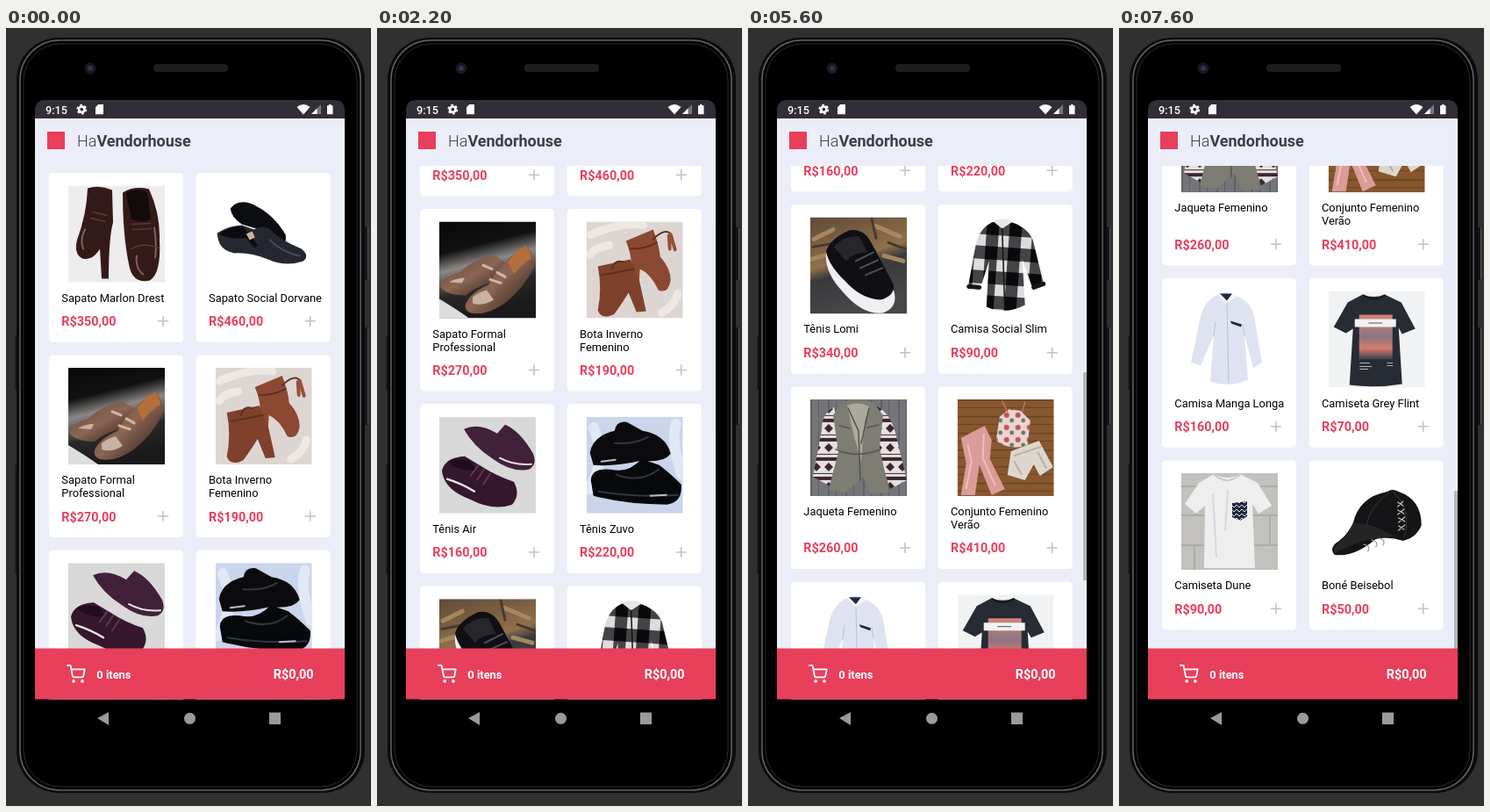
Recreate the animation shown at these times as an HTML page. Size 416 by 886 pixels, loop 8000 ms.

```html
<!DOCTYPE html>
<html lang="pt">
<head>
<meta charset="utf-8">
<title>Loja</title>
<style>
html, body { margin: 0; height: 100%; overflow: hidden; background: #303030; }
svg { display: block; font-family: Roboto, sans-serif; }
.name { font-size: 12.87px; fill: #000; }
.price { font-size: 14.4px; font-weight: 700; fill: #e83f5b; }
.icon { fill: none; stroke-linecap: round; stroke-linejoin: round; }
</style>
</head>
<body>
<svg width="416" height="886" viewBox="0 0 416 886">
  <defs>
    <linearGradient id="studio" x2=".25" y2="1">
      <stop offset="0" stop-color="#080808"/><stop offset=".32" stop-color="#111"/>
      <stop offset=".5" stop-color="#8a8886"/><stop offset=".75" stop-color="#2a2928"/>
      <stop offset="1" stop-color="#1a1a1a"/>
    </linearGradient>
    <linearGradient id="leather" x2="1" y2="1">
      <stop offset="0" stop-color="#6b4434"/><stop offset=".5" stop-color="#8b6654"/><stop offset="1" stop-color="#24130e"/>
    </linearGradient>
    <linearGradient id="stone" x2=".3" y2="1">
      <stop offset="0" stop-color="#604a38"/><stop offset=".5" stop-color="#907049"/>
      <stop offset=".62" stop-color="#3a3a3c"/><stop offset="1" stop-color="#47474a"/>
    </linearGradient>
    <linearGradient id="sunset" x2="0" y2="1">
      <stop offset="0" stop-color="#d28476"/><stop offset=".5" stop-color="#8d7481"/>
      <stop offset=".75" stop-color="#d77b6b"/><stop offset="1" stop-color="#3a3e4c"/>
    </linearGradient>
    <pattern id="plaid" width="26" height="28" patternUnits="userSpaceOnUse" patternTransform="translate(8 3) rotate(4)">
      <path fill="#dcdcde" d="M0 0H26V28H0Z"/><path fill="#0a0a0c" fill-opacity=".72" d="M0 0H14V28H0ZM0 0H26V15H0Z"/>
      <path fill="#0a0a0c" d="M0 0H14V15H0Z"/>
    </pattern>
    <pattern id="knit" width="14" height="22" patternUnits="userSpaceOnUse">
      <path fill="#e6e1de" d="M0 0H14V22H0Z"/><path fill="#3c2430" d="M0 0H14V4H0ZM7 6L12 11L7 16L2 11ZM0 18H14V19H0Z"/>
    </pattern>
    <pattern id="boards" width="20" height="110" patternUnits="userSpaceOnUse">
      <path fill="#747579" d="M0 0H20V110H0Z"/><path fill="#606167" d="M0 0H2V110H0ZM9 0H10V110H9Z"/>
    </pattern>
    <pattern id="planks" width="110" height="19" patternUnits="userSpaceOnUse">
      <path fill="#87582f" d="M0 0H110V19H0Z"/><path fill="#6a4222" d="M0 0H110V1.5H0ZM0 9H110V10H0Z"/>
    </pattern>
    <pattern id="floral" width="13" height="14" patternUnits="userSpaceOnUse">
      <path fill="#e8d5cf" d="M0 0H13V14H0Z"/><circle cx="4" cy="4" r="3" fill="#c0505a"/><circle cx="10" cy="10" r="2.4" fill="#6b7561"/>
    </pattern>
    <pattern id="zigzag" width="6" height="5" patternUnits="userSpaceOnUse">
      <path fill="#20283f" d="M0 0H6V5H0Z"/><path fill="none" stroke="#dfe2e8" d="M0 4L3 1L6 4"/>
    </pattern>
    <clipPath id="view"><path d="M33 157H386V764.500H33Z"/></clipPath>
    <clipPath id="photo"><path d="M0 0H110V110H0Z"/></clipPath>
  </defs>

  <!-- phone -->
  <path fill="#303030" d="M0 0H416V886H0Z"/>
  <path stroke="#15161a" stroke-width="3" d="M410.500 227V287M410.500 341V452M12 350V412M12 497V622"/>
  <path stroke="#55585c" d="M412.500 228V286M412.500 342V451"/>
  <rect x="12" y="11" width="397" height="860" rx="48" fill="#0b0c0d"/>
  <rect x="16" y="14" width="388" height="854" rx="45" fill="#000" stroke="#606367" stroke-width="1.500"/>
  <rect x="20" y="18" width="380" height="846" rx="42" fill="#000" stroke="#2b2d30"/>
  <circle cx="96" cy="46" r="6.500" fill="#17191e"/><circle cx="96" cy="46" r="3" fill="#2b3450"/>
  <rect x="168" y="41" width="85" height="9" rx="4" fill="#1d1d1f"/>
  <path fill="#9a9a9a" d="M104 786L117 779V794ZM300 779.500H313V793H300Z"/><circle cx="209.500" cy="786.300" r="6.500" fill="#9a9a9a"/>

  <!-- screen -->
  <path fill="#ebeef8" d="M33 100H386V764H33Z"/>
  <path fill="#312e38" d="M33 103V94Q33 82 45 82H374Q386 82 386 94V103Z"/>
  <g fill="#fff">
    <text x="45" y="97.500" font-size="12.700" font-weight="500">9:15</text>
    <circle cx="86.300" cy="92.700" r="3.200" fill="none" stroke="#fff" stroke-width="2.700"/>
    <circle cx="86.300" cy="92.700" r="5" fill="none" stroke="#fff" stroke-width="1.800" stroke-dasharray="2.6 2.636"/>
    <path d="M105.200 87H111V98.300H102V90.200Z"/>
    <path d="M331.500 90Q339 84 346.500 90L339 98.500Z"/>
    <path fill="#77757d" d="M359 87V98H348Z"/><path d="M354.500 91.500V98H348Z"/>
    <path d="M366 88.300H368V87H370.500V88.300H372.500V98.300H366Z"/>
  </g>
  <path fill="#e83f5b" d="M47 118H67V138H47Z"/>
  <text x="81" y="135" font-size="18" fill="#3d3d4d"><tspan font-weight="300">Ha</tspan><tspan font-weight="700">Vendorhouse</tspan></text>

  <g clip-path="url(#view)">
    <g id="list"></g>
    <rect id="bar" x="382" width="4" height="237" fill="#b3b3b8"/>
  </g>

  <!-- cart -->
  <path fill="#e83f5b" d="M33 706.600H386V764.500H33Z"/>
  <g class="icon" stroke="#fff" stroke-width="2" transform="translate(69 725) scale(.9)">
    <path d="M1 1H5L7.700 14.400A2 2 0 0 0 9.700 16H19.400A2 2 0 0 0 21.400 14.400L23 6H6"/>
    <circle cx="9" cy="21" r="1"/><circle cx="20" cy="21" r="1"/>
  </g>
  <g fill="#fff" font-weight="700">
    <text x="103.300" y="741" font-size="12.870">0 itens</text>
    <text x="350.500" y="741" font-size="14.400" text-anchor="end">R$0,00</text>
  </g>
</svg>
<script>
const fill = (color, d) => `<path fill="${color}" d="${d}"/>`;
const line = (color, width, d) => `<path class="icon" stroke="${color}" stroke-width="${width}" d="${d}"/>`;
const back = color => fill(color, 'M0 0H110V110H0Z');

const products = [
  ['Sapato Marlon Drest', '350', back('#eeeced')
    + fill('#351a1a', 'M22 3Q36 -1 50 5L51 42Q46 60 46 106H38L36 72Q28 86 16 83Q6 78 10 62Q21 32 22 3Z')
    + fill('#351a1a', 'M62 8Q75 0 92 4Q105 32 104 62Q106 100 93 108Q75 112 70 94Q62 60 62 8Z')
    + fill('#120a0b', 'M66 8Q79 2 90 8L94 38Q84 44 72 38Z')
    + line('#80605c', 2, 'M19 50Q13 62 17 72M78 80Q76 94 85 101M98 48Q101 66 99 82')
    + line('#5c3937', 1.5, 'M28 30L44 34M26 37L42 41M73 44L94 43M74 50L95 49M72 72Q86 64 103 71')],
  ['Sapato Social Dorvane', '460', back('#fff')
    + fill('#0c0d12', 'M17 26Q26 15 42 21Q66 32 80 56Q82 70 70 68L50 50L30 44Q18 36 17 26Z')
    + fill('#252731', 'M2 54Q14 46 30 45L44 50Q54 44 62 50Q74 62 98 72Q108 80 100 86Q80 93 60 84Q40 76 22 77Q3 74 2 54Z')
    + fill('#0b0c10', 'M4 55Q17 46 31 46L40 58Q20 64 4 55Z') + line('#494b59', 2, 'M62 62Q76 76 96 80')
    + line('#0b0c10', 5, 'M33 53L45 68') + fill('#c9b3a0', 'M35 55L42 52L45 59L39 62Z')],
  ['Sapato Formal|Professional', '270', back('url(#studio)')
    + fill('#ddd', 'M0 88Q20 100 34 110H0Z')
    + fill('url(#leather)', 'M1 74Q2 64 22 58Q40 42 62 38L78 48L70 66Q44 72 30 84Q8 84 1 74Z')
    + fill('url(#leather)', 'M30 94Q36 80 56 72Q72 44 98 27Q108 34 109 50Q96 76 76 92Q54 108 36 104Q28 101 30 94Z')
    + fill('#b46e39', 'M78 46Q88 32 99 28Q104 34 105 42Q94 48 85 60Z')
    + fill('#c8b2a1', 'M38 86Q45 80 54 78L62 89Q49 97 38 93ZM11 69Q20 64 29 64L26 70Z')
    + line('#d0b6a0', 3, 'M58 66L70 70M50 50L60 54M66 58L75 63')],
  ['Bota Inverno|Femenino', '190', back('#ddd5d1')
    + line('#eee8e5', 9, 'M5 15Q40 0 65 4M4 38Q12 28 26 27M86 104Q101 95 104 82')
    + fill('#8b4932', 'M45 22L76 9Q83 27 84 40Q96 53 96 67Q93 83 82 78Q73 59 61 54L60 69L49 66Q55 46 45 22Z')
    + fill('#7f412c', 'M13 51L50 43L60 66L68 102L57 103L48 81Q42 91 32 105Q17 113 13 101Q18 76 13 51Z')
    + line('#60301f', 2, 'M50 31Q66 32 80 24M17 61L54 54M76 20Q90 7 96 14M42 46Q32 43 29 54')
    + line('#95513a', 4, 'M96 15L101 32M94 16L95 31')],
  ['Tênis Air', '160', back('#d9d8d9')
    + fill('#43203a', 'M28 14Q45 6 66 19L75 9Q92 16 107 42Q112 55 102 60Q83 64 61 48Q39 34 28 14Z')
    + line('#e7e2e7', 2, 'M69 47Q86 56 105 54')
    + fill('#36172d', 'M3 61Q7 46 29 45L49 57Q64 67 85 74Q93 89 83 100Q62 108 35 94Q5 83 3 61Z')
    + fill('#210c1d', 'M10 51Q24 45 37 52L42 61Q22 63 10 51Z')
    + line('#ece8ec', 2.4, 'M9 71Q25 76 40 85') + line('#5f3653', 2, 'M44 56L36 67M51 60L43 72M58 65L50 77')],
  ['Tênis Zuvo', '220', back('#cad4eb')
    + line('#e0e7f5', 12, 'M8 12Q25 50 2 83M102 8Q96 30 109 66')
    + fill('#0b0b0f', 'M4 41Q7 22 32 16Q34 4 46 6L64 16Q90 20 96 42Q88 53 62 50Q32 57 8 55Z')
    + fill('#08090c', 'M5 72Q6 58 28 60Q47 65 63 48L83 55Q95 64 108 77Q110 97 92 100Q44 100 8 90Z')
    + line('#33353b', 2, 'M32 30Q55 32 70 23M34 66Q62 76 82 60M14 85Q55 92 104 89')
    + line('#b8bdc6', 2, 'M73 90L91 89M17 51L33 49')],
  ['Tênis Lomi', '340', back('url(#stone)')
    + line('#a48761', 5, 'M4 25L26 14M2 48L18 43M74 10L102 22M84 44L106 50')
    + line('#493a2e', 3, 'M3 34L26 30M70 2L75 24M89 29L108 36')
    + fill('#efeff1', 'M18 41Q24 52 44 76Q59 92 79 92L95 83Q101 102 83 109Q60 112 37 85Q16 63 18 41Z')
    + fill('#101014', 'M18 39Q22 25 44 15Q60 12 69 28Q84 56 95 77Q96 90 80 94Q58 93 40 73Q21 55 18 39Z')
    + fill('#26262b', 'M27 34Q38 20 56 22L65 40Q48 40 41 50Z') + line('#505058', 2, 'M52 50L72 40M57 58L77 49M63 66L82 58')],
  ['Camisa Social Slim', '90', back('#fff')
    + fill('url(#plaid)', 'M39 6L51 2L63 6Q81 13 86 26L98 75L86 82L74 48L77 100Q54 112 33 102L36 50L27 78L12 80L21 31Q25 13 39 6Z')
    + line('#16161a', 5, 'M13 79L25 80M87 80L98 76') + fill('#e7e7ea', 'M41 5L51 13L63 5L57 2H46Z')
    + line('#111', 1.5, 'M51 13L54 105')],
  ['Jaqueta Femenino', '260', back('url(#boards)')
    + fill('url(#knit)', 'M27 9Q13 16 13 35L3 88L23 99L37 52ZM76 8Q92 16 98 42L110 92L91 102L76 55Z')
    + fill('#7e7d73', 'M35 5Q52 -5 73 5L83 18L79 55L90 106L69 107L60 88L39 107L21 102L32 60L26 18Z')
    + fill('#aaa99d', 'M42 7Q55 2 67 8L62 25L58 70L50 43Z')
    + line('#55554e', 1.5, 'M43 10L55 36L57 92M67 10L58 50M29 57Q53 68 80 57M33 30L45 33M65 32L78 29')],
  ['Conjunto Femenino|Verão', '410', back('url(#planks)')
    + fill('#db9b98', 'M4 44L31 30L39 46L37 68L54 102L39 109L25 75L20 109H4L10 73Z')
    + line('#f0bdb8', 2, 'M12 52L16 71L10 101M30 40L29 67L43 98')
    + fill('url(#floral)', 'M48 20L59 11L72 13L83 24L80 52Q61 59 44 47Z')
    + line('#c86d70', 1.5, 'M57 14L51 2M74 14L77 3')
    + fill('#ddd6cc', 'M61 59L93 47L109 77L94 87L87 74L77 92L57 86Z') + line('#b9afa4', 2, 'M65 64L95 54M65 71L73 85M92 61L101 78')],
  ['Camisa Manga Longa', '160', back('#fff')
    + fill('#dfe3f1', 'M39 5L51 1L64 6Q80 13 83 29L92 81L82 88L72 50L76 101Q54 111 33 103L37 51L22 85L11 81L22 29Q26 13 39 5Z')
    + fill('#f4f5fb', 'M41 4L51 14L65 6L56 2Z') + fill('#202940', 'M44 3H58L52 11ZM56 34L69 38L68 41L57 37Z')
    + line('#b8bfd4', 1, 'M52 14L54 104M37 51L39 35M72 50L70 38')],
  ['Camiseta Grey Flint', '70', back('#f1f2f3')
    + fill('#272b34', 'M39 4Q52 9 64 4L83 13L99 43L84 49L80 42L84 106Q54 111 24 107L28 43L20 48L6 41L22 13Z')
    + line('#12161e', 2, 'M40 5Q51 13 64 5') + fill('url(#sunset)', 'M35 27H73V78H35Z')
    + fill('#f3f2f2', 'M30 32H77V41H30Z') + line('#4e5560', 1, 'M46 36.500H61')
    + line('#aeb2b8', 1, 'M36 82H47M36 86H49M36 89H45M67 82H73M67 85H73')],
  ['Camiseta Dune', '90', back('#c2c1be')
    + line('#aeaca8', 2, 'M0 15H110M0 48H110M0 82H110M17 15V48M101 48V82M15 82V110')
    + fill('#eeeeef', 'M37 1Q53 9 67 1L87 11L103 37L88 46L81 35L84 108H26L27 37L17 46L4 35L20 11Z')
    + line('#cbcdd2', 2, 'M38 2Q52 14 67 2') + line('#d7d8dc', 2, 'M36 24L40 95M53 20L50 65')
    + fill('url(#zigzag)', 'M58 34L75 32V49L67 54L58 50Z')],
  ['Boné Beisebol', '50', back('#fff')
    + fill('#151517', 'M28 57Q35 27 67 21Q73 17 80 21Q106 30 106 59Q101 73 85 77Q70 72 54 75Q29 96 7 93Q1 87 8 80Q20 73 28 57Z')
    + fill('#252528', 'M28 57Q50 56 75 72Q41 72 7 91Q5 85 12 79Q23 72 28 57Z')
    + line('#38383b', 1, 'M69 22Q47 38 43 60M74 22Q94 38 87 72')
    + line('#c6c2bc', 1.2, 'M79 33L85 37M85 32L79 38M79 42L86 46M86 41L79 47M80 51L87 55M87 50L80 56M80 60L86 64M87 59L80 65')
    + line('#a69a91', 1.2, 'M40 81Q49 83 45 89M49 76Q58 78 54 84M58 74Q66 76 62 82')]
];

let rowTop = 165, cards = '';
for (let i = 0; i < products.length; i += 2) {
  const pair = products.slice(i, i + 2);
  const height = pair.some(([label]) => label.includes('|')) ? 207.5 : 192.7;
  pair.forEach(([label, price, art], column) => {
    const lines = label.split('|').map((part, n) =>
      `<text class="name" x="14.3" y="${146.5 + n * 15}">${part}</text>`).join('');
    cards += `<g transform="translate(${49 + column * 167.7} ${rowTop})">
      <rect width="153" height="${height}" rx="4.3" fill="#fff"/>
      <g transform="translate(22 14.4)" clip-path="url(#photo)">${art}</g>${lines}
      <text class="price" x="14.3" y="${height - 18.5}">R$${price},00</text>
      ${line('#c3c3c7', 1.6, `M124.5 ${height - 24}H135.5M130 ${height - 29.5}V${height - 18.5}`)}
    </g>`;
  });
  rowTop += height + 14.8;
}

const list = document.getElementById('list'), bar = document.getElementById('bar');
list.innerHTML = cards;

const range = (from, to) => Array.from({ length: (to - from) / 100 + 1 }, (_, i) => from + i * 100);
const ticks = [0, ...range(800, 1600), ...range(3300, 4100), 4800, 5000, 5200, 5400,
  ...range(5600, 6100), 6700, 6900, 7100, 7300, 7600];
const fling = u => 1 - (1 - u) ** 1.72;
const drag = u => u * u * (3 - 2 * u);
// start, end, distance, easing
const swipes = [
  [700, 1600, 166.5, fling],
  [3200, 4100, 237.5, fling],
  [4700, 6100, 278.5, drag],
  [6600, 7600, 264.5, drag]
];
// time, scrollbar opacity
const fades = [[0, 0], [800, 1], [2100, .45], [2200, .07], [3300, 1], [4500, .45],
  [4600, .07], [4800, 1], [6500, 0], [6700, 1]];

function draw() {
  const time = performance.now() % 8000;
  const tick = ticks.findLast(t => t <= time);
  const scroll = swipes.reduce((sum, [start, end, distance, ease]) =>
    sum + distance * ease(Math.min(1, Math.max(0, (tick - start) / (end - start)))), 0);
  list.setAttribute('transform', `translate(0 ${-scroll})`);
  bar.setAttribute('y', 157 + scroll * .391);
  bar.setAttribute('opacity', fades.findLast(([t]) => t <= time)[1]);
  requestAnimationFrame(draw);
}
draw();
</script>
</body>
</html>
```
